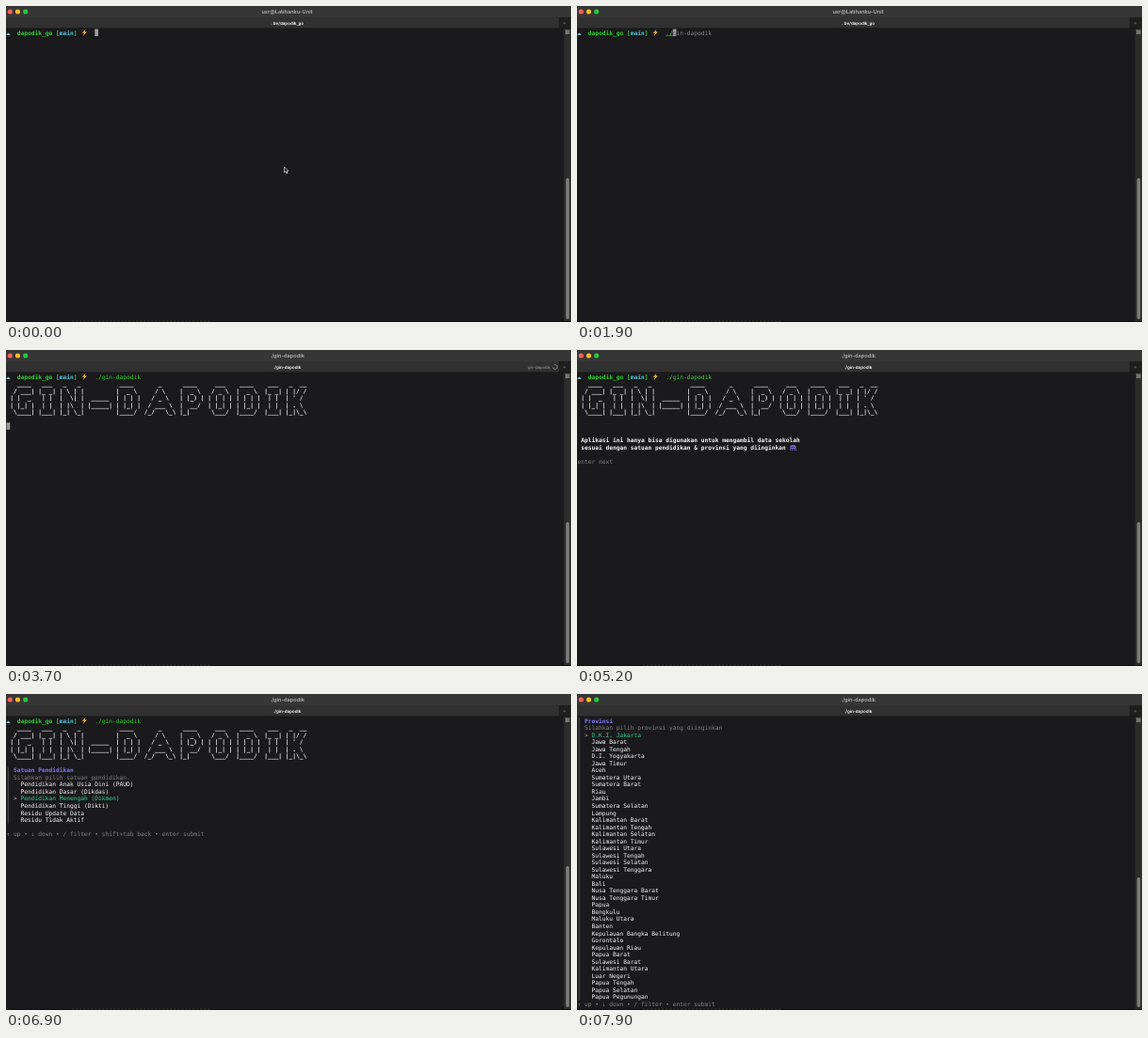
An HTML page with a canvas that plays this animation: 600x336 px, repeating every 8000 ms.

```html
<!DOCTYPE html>
<html lang="id">
<head>
<meta charset="utf-8">
<title>Terminal</title>
<style>
html, body { margin: 0; width: 100%; height: 100%; overflow: hidden; background: #1a191b; }
canvas { display: block; width: 600px; height: 336px; }
</style>
</head>
<body>
<canvas id="stage" width="600" height="336"></canvas>
<script>
const ctx = document.getElementById('stage').getContext('2d');
const LOOP = 8000;
const CELL = 3.75, LINE = 7.527, LEFT = 0.5, TOP = 24.8;
const MONO = '"DejaVu Sans Mono", monospace';
const SANS = 'Inter, sans-serif';
const COLOR = {
  back: '#1a191b', bar: '#363637', text: '#f6f6f6', dim: '#828282', green: '#30cf35', cyan: '#56c5dc',
  title: '#8077f5', chosen: '#36d592', pointer: '#ee9ad4', cursor: '#9a9a9a'
};

// Times in ms at which the session moves on
const AT = {
  dot: 1400, slash: 1700, complete: 2500, run: 2800, banner: 2900,
  busy: 3300, intro: 3800, idle: 5100, levels: 5500, provinces: 7300
};
const MOVES = [[0, 0], [6100, 1], [6400, 2], [6600, 3], [6850, 2]];

const COMMAND = './gin-dapodik';
const BANNER = String.raw`
   ____   ___   _   _           ____       _      ____     ___    ____    ___   _  __
  / ___| |_ _| | \ | |         |  _ \     / \    |  _ \   / _ \  |  _ \  |_ _| | |/ /
 | |  _   | |  |  \| |  _____  | | | |   / _ \   | |_) | | | | | | | | |  | |  | ' /
 | |_| |  | |  | |\  | |_____| | |_| |  / ___ \  |  __/  | |_| | | |_| |  | |  | . \
  \____| |___| |_| \_|         |____/  /_/   \_\ |_|      \___/  |____/  |___| |_|\_\ `.split('\n').slice(1);
const LEVELS = ['Pendidikan Anak Usia Dini (PAUD)', 'Pendidikan Dasar (Dikdas)', 'Pendidikan Menengah (Dikmen)',
  'Pendidikan Tinggi (Dikti)', 'Residu Update Data', 'Residu Tidak Aktif'];
const PROVINCES = ('D.K.I. Jakarta,Jawa Barat,Jawa Tengah,D.I. Yogyakarta,Jawa Timur,Aceh,Sumatera Utara,Sumatera Barat,' +
  'Riau,Jambi,Sumatera Selatan,Lampung,Kalimantan Barat,Kalimantan Tengah,Kalimantan Selatan,Kalimantan Timur,' +
  'Sulawesi Utara,Sulawesi Tengah,Sulawesi Selatan,Sulawesi Tenggara,Maluku,Bali,Nusa Tenggara Barat,' +
  'Nusa Tenggara Timur,Papua,Bengkulu,Maluku Utara,Banten,Kepulauan Bangka Belitung,Gorontalo,Kepulauan Riau,' +
  'Papua Barat,Sulawesi Barat,Kalimantan Utara,Luar Negeri,Papua Tengah,Papua Selatan,Papua Pegunungan').split(',');

const colX = col => LEFT + col * CELL;
const rowY = row => TOP + row * LINE;

function rect(x, y, w, h, color) {
  ctx.fillStyle = color;
  ctx.fillRect(x, y, w, h);
}

function disc(x, y, r, color) {
  ctx.fillStyle = color;
  ctx.beginPath();
  ctx.arc(x, y, r, 0, 7);
  ctx.fill();
}

function polygon(x, y, points, fill, stroke) {
  ctx.beginPath();
  points.forEach(([px, py]) => ctx.lineTo(x + px, y + py));
  ctx.closePath();
  ctx.fillStyle = fill;
  ctx.fill();
  if (stroke) {
    ctx.strokeStyle = stroke;
    ctx.lineWidth = 0.8;
    ctx.stroke();
  }
}

// Terminal text, one glyph per cell
function print(col, row, text, color = COLOR.text, weight = 'normal') {
  ctx.font = `${weight} 6.23px ${MONO}`;
  ctx.textAlign = 'left';
  ctx.fillStyle = color;
  [...text].forEach((glyph, i) => {
    if (glyph !== ' ') ctx.fillText(glyph, colX(col + i), rowY(row) + 5.9);
  });
}

function label(text, x, y, size, color, weight, align = 'center') {
  ctx.font = `${weight} ${size}px ${SANS}`;
  ctx.textAlign = align;
  ctx.fillStyle = color;
  ctx.fillText(text, x, y);
}

function block(col, row) {
  rect(colX(col), rowY(row) - 0.3, CELL, LINE, COLOR.cursor);
}

function drawWindow(t) {
  const running = t >= AT.run;
  rect(0, 0, 600, 336, COLOR.back);
  rect(0, 0, 600, 24, COLOR.bar);
  rect(0, 12, 587, 12, '#303031');
  rect(587, 12, 13, 12, '#1e1e1f');
  rect(0, 23.5, 600, 0.6, '#141415');
  ['#ff5f57', '#febc2e', '#28c840'].forEach((color, i) => disc(4.3 + i * 8.2, 6, 2.6, color));
  label(running ? COMMAND : 'usr@Latihanku-Unit', 298.5, 8.1, 5.6, '#b0b0b0', 600);
  label(running ? COMMAND : '..be/dapodik_go', 298.5, 19.6, 4.5, '#fff', 600);
  label('+', 593, 20, 6, '#777', 400);

  if (t >= AT.busy && t < AT.idle) {
    label('gin-dapodik', 554, 19.6, 4.2, '#a0a0a0', 400, 'left');
    const turn = t / 1000 * Math.PI * 2;
    ctx.strokeStyle = '#a0a0a0';
    ctx.lineWidth = 0.7;
    ctx.beginPath();
    ctx.arc(583, 18, 2.4, turn, turn + 5);
    ctx.stroke();
  }

  const thumbTop = t < AT.provinces ? 183 : 195;
  rect(592.5, 24, 7.5, 312, '#2c2c2c');
  rect(594, 25.5, 4.5, 4.5, '#777');
  ctx.fillStyle = '#7b7b79';
  ctx.beginPath();
  ctx.roundRect(594.6, thumbTop, 3.6, 333 - thumbTop, 1.8);
  ctx.fill();
  rect(0, 335, 600, 1, '#0e0e0f');
  for (let x = 70; x < 215; x += 4) rect(x, 334.8, 2.6, 0.7, '#3b3b3c');
}

function drawPrompt(t) {
  rect(0.6, 29.6, 3.6, 1.3, '#8ecfdc');
  rect(1.5, 28.8, 1.5, 1, '#8ecfdc');
  print(3, 0, 'dapodik_go', COLOR.green, 'bold');
  print(14, 0, '[    ]', COLOR.green, 'bold');
  print(15, 0, 'main', COLOR.cyan, 'bold');
  polygon(80, 24.8, [[4.5, 0], [0.8, 4], [3, 4], [1.7, 7], [6, 2.8], [3.6, 2.8]], '#f5b83b');

  const typed = t < AT.dot ? 0 : t < AT.slash ? 1 : t < AT.complete ? 2 : COMMAND.length;
  if (t < AT.run) block(25 + typed, 0);
  print(25, 0, COMMAND.slice(0, typed), COLOR.green);
  if (typed && typed < COMMAND.length) {
    rect(colX(25), 31.5, typed * CELL, 0.6, COLOR.green);
    print(25 + typed, 0, COMMAND[typed], '#707070');
    print(26 + typed, 0, COMMAND.slice(typed + 1), COLOR.dim);
  }
}

function drawAlien(x, y) {
  const purple = '#7562c4';
  rect(x + 1.4, y, 4.2, 1, purple);
  rect(x + 0.4, y + 1, 6.2, 3.2, purple);
  [0, 2, 4, 6].forEach(dx => rect(x + dx, y + 4.2, 1, 1.6, purple));
  rect(x + 2, y + 2, 1, 1, COLOR.back);
  rect(x + 4, y + 2, 1, 1, COLOR.back);
}

function drawIntro() {
  print(1, 9, 'Aplikasi ini hanya bisa digunakan untuk mengambil data sekolah', COLOR.text, 'bold');
  print(1, 10, 'sesuai dengan satuan pendidikan & provinsi yang diinginkan', COLOR.text, 'bold');
  drawAlien(226, 101);
  print(0, 12, 'enter next', COLOR.dim);
}

function drawMenu(row, title, hint, items, selected) {
  rect(1.8, rowY(row), 0.8, (items.length + 2) * LINE, '#606060');
  print(2, row, title, COLOR.title, 'bold');
  print(2, row + 1, hint, COLOR.dim);
  items.forEach((item, i) => {
    print(4, row + 2 + i, item, i === selected ? COLOR.chosen : COLOR.text);
  });
  print(2, row + 2 + selected, '>', COLOR.pointer);
}

function drawSession(t) {
  if (t >= AT.provinces) {
    drawMenu(0, 'Provinsi', 'Silahkan pilih provinsi yang diinginkan', PROVINCES, 0);
    print(0, 40, '↑ up • ↓ down • / filter • enter submit', COLOR.dim);
    return;
  }
  drawPrompt(t);
  if (t >= AT.banner) BANNER.forEach((line, i) => print(0, i + 1, line, '#fff', 'bold'));
  if (t >= AT.levels) {
    const selected = MOVES.filter(([time]) => t >= time).pop()[1];
    drawMenu(7, 'Satuan Pendidikan', 'Silahkan pilih satuan pendidikan.', LEVELS, selected);
    print(0, 16, '↑ up • ↓ down • / filter • shift+tab back • enter submit', COLOR.dim);
  } else if (t >= AT.intro) {
    drawIntro();
  } else if (t >= AT.run) {
    block(0, t < AT.banner ? 1 : 7);
  }
}

function drawPointer() {
  polygon(295.6, 171, [[0, 0], [0, 6], [1.4, 4.8], [2.4, 7], [3.4, 6.5], [2.5, 4.5], [4.2, 4.3]], '#111', '#ddd');
}

const start = performance.now();
function frame() {
  const t = (performance.now() - start) % LOOP;
  ctx.textRendering = 'geometricPrecision';
  drawWindow(t);
  drawSession(t);
  if (t < AT.dot) drawPointer();
  requestAnimationFrame(frame);
}
frame();
</script>
</body>
</html>
```
